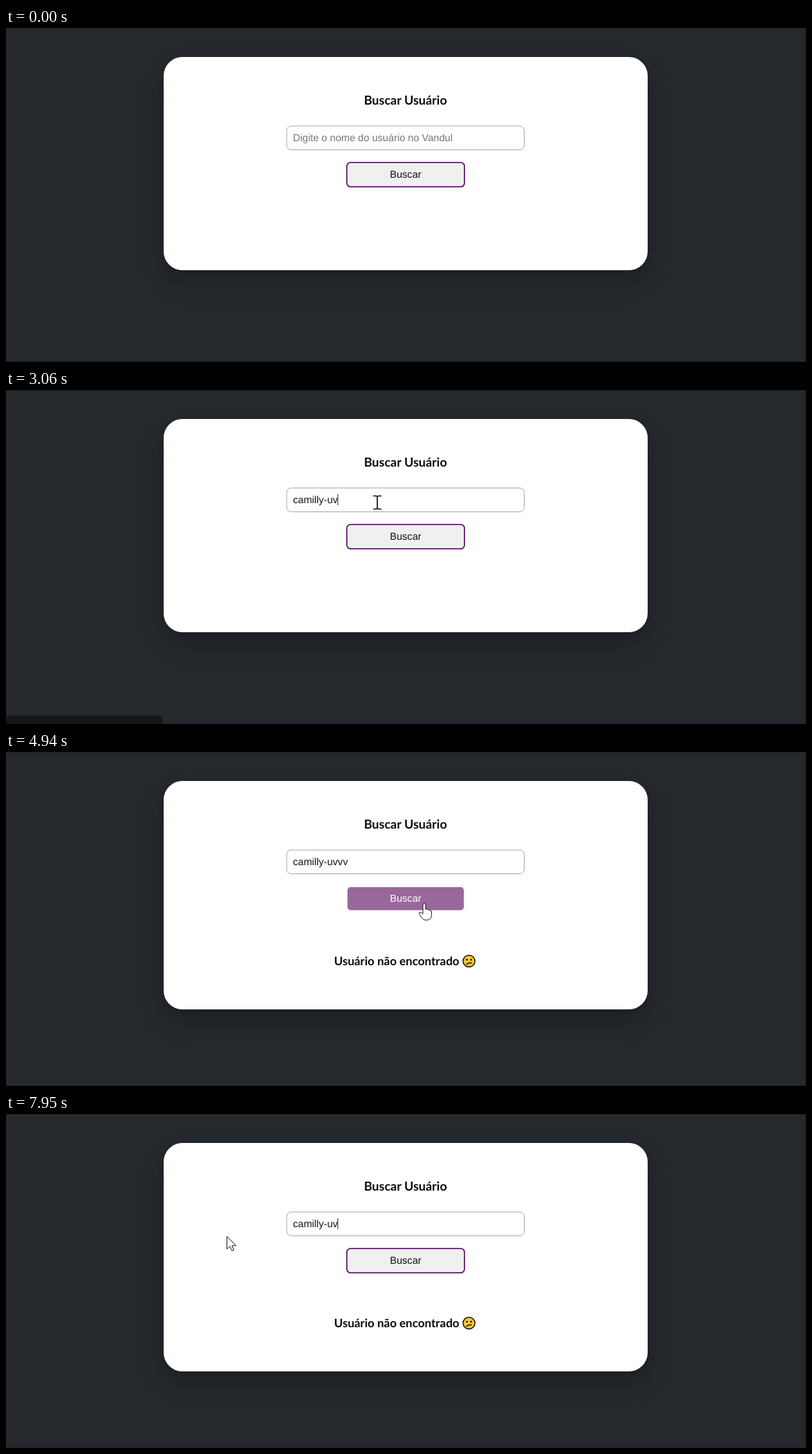
An HTML page for the animation above (8000 ms loop, 1157 by 484 pixels).

```html
<!DOCTYPE html>
<html lang="pt">
<head>
<meta charset="utf-8">
<title>Buscar Usuário</title>
<style>
  html, body { margin: 0; width: 100%; height: 100%; overflow: hidden; background: #25282d; }
  #card {
    position: absolute; left: 228px; top: 42px; width: 700px; height: 309px;
    border-radius: 27px; background: #fff;
    box-shadow: 0 18px 36px rgba(0, 0, 0, .2), 0 4px 10px rgba(0, 0, 0, .08);
  }
  svg { position: absolute; left: 0; top: 0; display: block; }
  text { text-rendering: geometricPrecision; }
  .ui { font: 14.6px "Liberation Sans", Arial, sans-serif; }
  .title { font-family: Lato, sans-serif; font-weight: 700; text-anchor: middle; fill: #0a0a0a; }
</style>
</head>
<body>
<div id="card"></div>
<svg width="1157" height="484" viewBox="0 0 1157 484">
  <defs>
    <clipPath id="selClip"><rect id="clipBox" y="145" height="30"/></clipPath>
  </defs>
  <g fill="#1c1f23">
    <rect width="1157" height="1"/>
    <rect y="483" width="1157" height="1"/>
    <rect x="1156" width="1" height="484"/>
  </g>
  <path id="bar" d="M0 472H223q3 0 3 3V484H0z" fill="#161718"/>

  <text class="title" x="577.7" y="111.4" font-size="18">Buscar Usuário</text>

  <rect x="406" y="142" width="343.5" height="34.5" rx="6.5" fill="#fff" stroke="#a9a9ab"/>
  <text id="hint" class="ui" x="415" y="164" fill="#757575">Digite o nome do usuário no Vandul</text>
  <text id="value" class="ui" x="415" y="164" fill="#161616"></text>
  <g id="sel">
    <rect id="selBox" y="151" height="16" fill="#3367d1"/>
    <text id="valueSel" class="ui" x="415" y="164" fill="#fff" clip-path="url(#selClip)"></text>
    <path d="M416 166.3H495" stroke="#b8487c"/>
  </g>
  <rect id="caret" y="151" width="1" height="16" fill="#222"/>

  <rect id="btn" x="492.9" y="194.9" width="170.200" height="35.200" rx="5.500" stroke-width="1.800"/>
  <text id="btnText" class="ui" x="577.900" y="217" text-anchor="middle">Buscar</text>

  <g id="msg">
    <text class="title" x="565" y="308.900" font-size="17">Usuário não encontrado</text>
    <g transform="translate(669.600 303)">
      <circle r="8.600" fill="#f8c437" stroke="#16130c" stroke-width="1.500"/>
      <circle cx="-3" cy="-2" r="1.350" fill="#16130c"/>
      <circle cx="3" cy="-2" r="1.350" fill="#16130c"/>
      <path d="M-3.600 4.600Q-.5 2 3.800 2.600" fill="none" stroke="#16130c" stroke-width="1.400" stroke-linecap="round"/>
    </g>
  </g>

  <circle id="disc" cx="-2.5" cy="-1.5" r="14.5" fill="#ff0" fill-opacity=".58"/>
  <g id="cursor">
    <path id="arrow" d="M.5 .5V18.6L4.8 14.8L7.7 21.2L10.5 20L7.8 13.8H13.6Z" fill="#fff" stroke="#1a1a1a"/>
    <path id="beam" d="M-6 -9.5H-1.5L0 -8.5L1.5 -9.5H6M0 -8.5V8.5M-6 9.5H-1.5L0 8.5L1.5 9.5H6" fill="none" stroke="#111" stroke-width="1.7"/>
    <path id="hand" d="M-1 13V2.4a1.9 1.9 0 0 1 3.8 0V9q2.4 -1.4 3.2 .7q2.4 -1 3 1q2.5 -.5 2.5 2V16.5q0 8 -7 8H2.5q-3 0 -5 -3L-6.4 15.5q-.6 -2.4 1.8 -2.3q1.6 .3 3.6 2.5z" fill="#fff" stroke="#1a1a1a" stroke-linejoin="round"/>
  </g>
</svg>
<script>
const LOOP = 8000, STEP = 68, BLINK = 525, FADE = 400, TEXT_X = 415;
const CLICK = 2010, FOUND = 4810, DRAG = 6480, DROP = 6890, DESELECT = 7290;
const USER = 'camilly-uvvv';

const $ = id => document.getElementById(id);
const clamp = (v, lo = 0, hi = 1) => Math.min(hi, Math.max(lo, v));
const mix = (a, b, p) => a.map((v, i) => v + (b[i] - v) * p);
const rgb = c => `rgb(${c.map(Math.round)})`;
const within = (t, spans) => spans.some(([a, b]) => t >= a && t < b);
const show = (id, on) => { $(id).style.display = on ? '' : 'none'; };
const linear = p => p;
const easeOut = p => 1 - (1 - p) ** 2;

const moves = [
  { start: 1110, end: 1730, from: [574, 383], to: [519, 161], ease: easeOut },
  { start: 2990, end: 3060, from: [530, 162], to: [537, 163] },
  { start: 4000, end: 4204, from: [541, 165], to: [597, 198] },
  { start: 4270, end: 4740, from: [599, 203], to: [604, 219], ease: easeOut },
  { start: 6060, end: 6405, from: [602, 214], to: [567, 163] },
  { start: DRAG, end: 6820, from: [567, 163], to: [271, 160] },
  { start: DROP, end: 7020, from: [266, 158], to: [257, 155] },
  { start: DESELECT, end: 7480, from: [259, 154], to: [267, 153] },
  { start: 7740, end: 7950, from: [276, 158], to: [319, 177] }
];
// Field events: time, change in length
const keys = [[CLICK, 0], [2730, 10], [3520, 1], [3610, 1], [DESELECT, 0], [7350, -1], [7480, -1]];
const pressed = [[CLICK, 2140], [DRAG, DROP]];
const hovered = [[1400, 1530], [4270, 6200]];
const barOn = [[2800, 3720], [6950, 7150]];

function pointer(t) {
  const m = moves.findLast(m => t >= m.start);
  if (!m) return null;
  const n = Math.round((m.end - m.start) / STEP);
  const k = Math.floor((t - m.start) / (m.end - m.start) * n + 1e-6);
  return mix(m.from, m.to, (m.ease || linear)(clamp(k / n)));
}

function kindAt([x, y]) {
  if (x > 406 && x < 750 && y > 141 && y < 177) return 'beam';
  if (x > 492 && x < 664 && y > 194 && y < 231) return 'hand';
  return 'arrow';
}

// The pointer's shape lags one step behind its place
function drawPointer(t) {
  const pos = pointer(t), down = within(t, pressed);
  show('cursor', pos);
  show('disc', pos && down);
  if (!pos) return;
  const kind = down ? 'beam' : kindAt(pointer(t - STEP) || [0, 0]);
  for (const k of ['arrow', 'beam', 'hand']) show(k, k === kind);
  for (const id of ['cursor', 'disc']) $(id).setAttribute('transform', `translate(${pos})`);
}

function drawField(t) {
  const length = keys.reduce((sum, [at, d]) => sum + (t >= at ? d : 0), 0);
  const text = USER.slice(0, length);
  $('value').textContent = $('valueSel').textContent = text;
  show('hint', !text);
  const right = TEXT_X + (text ? $('value').getComputedTextLength() : 0);
  show('caret', keys.some(([at]) => t >= at && t < at + BLINK));
  $('caret').setAttribute('x', right - .5);

  const selecting = t >= DRAG && t < DESELECT;
  show('sel', selecting);
  if (!selecting) return;
  const left = clamp(pointer(t)[0], TEXT_X, right);
  for (const id of ['selBox', 'clipBox']) {
    $(id).setAttribute('x', left);
    $(id).setAttribute('width', right - left);
  }
}

function drawButton(t) {
  const fades = hovered.map(([a, b]) =>
    clamp((Math.min(t, b) - a) / FADE) - clamp((t - b) / FADE));
  const p = Math.max(0, ...fades);
  $('btn').setAttribute('fill', rgb(mix([240, 240, 240], [153, 104, 155], p)));
  $('btn').setAttribute('stroke', rgb(mix([100, 31, 112], [255, 255, 255], p)));
  $('btnText').setAttribute('fill', rgb(mix([22, 12, 26], [255, 255, 255], p)));
}

function draw(t) {
  const found = t >= FOUND;
  $('card').style.height = (found ? 331 : 309) + 'px';
  show('msg', found);
  show('bar', within(t, barOn));
  drawField(t);
  drawButton(t);
  drawPointer(t);
}

const began = performance.now();
function frame() {
  draw((performance.now() - began) % LOOP);
  requestAnimationFrame(frame);
}
frame();
</script>
</body>
</html>
```
